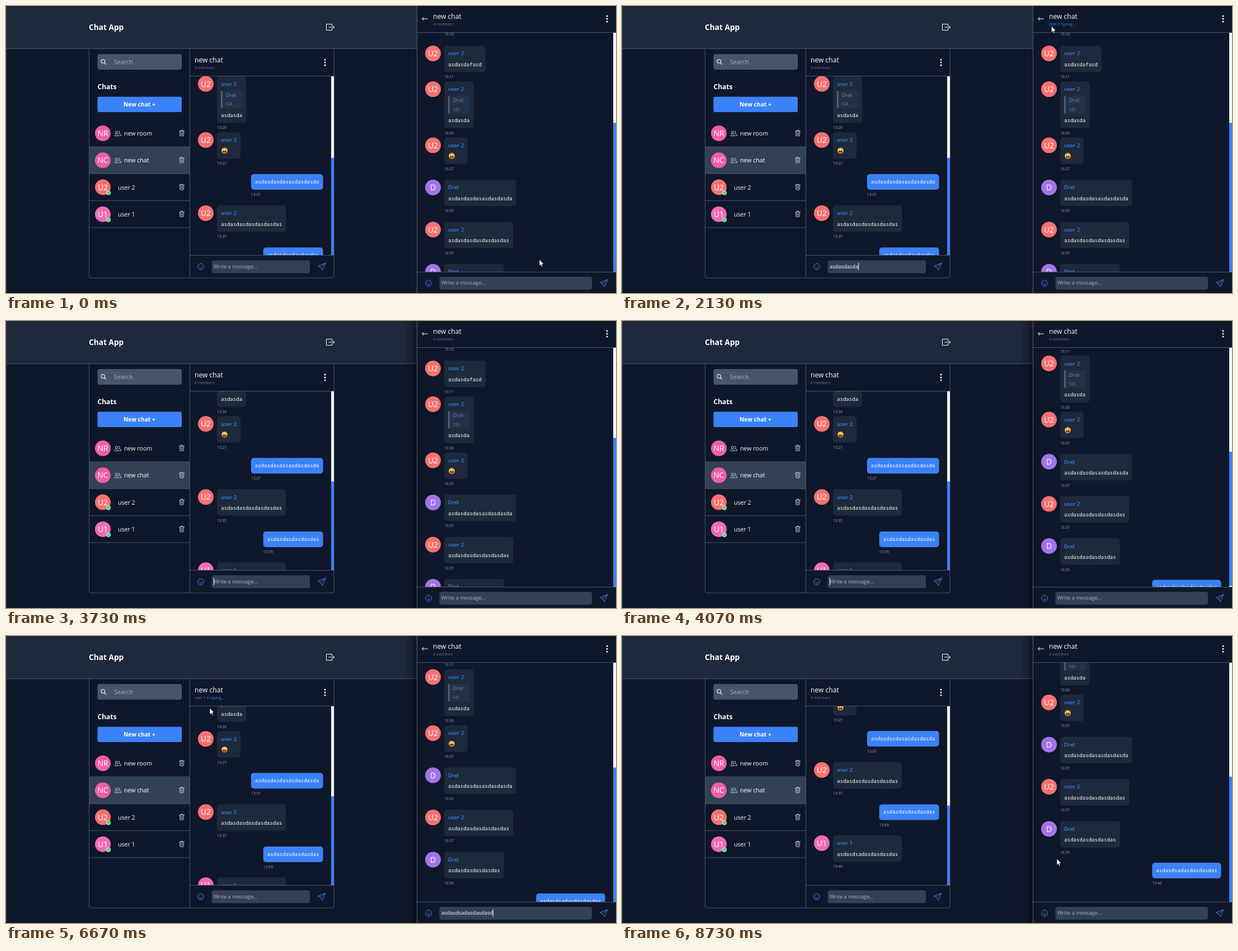
Animation, 1090 px wide and 514 px high, one loop 9540 ms. Source, as an HTML page:

```html
<!DOCTYPE html>
<html lang="en">
<head>
<meta charset="utf-8">
<title>Chat App</title>
<style>
  html, body { margin: 0; width: 100%; height: 100%; overflow: hidden; background: #0f172a; }
  svg { display: block; width: 100%; height: 100%; font-family: "Open Sans", "Noto Sans", sans-serif; }
  text { white-space: pre; }
  .mono { font-family: "Noto Sans Mono", "DejaVu Sans Mono", monospace; font-weight: 500; }
</style>
</head>
<body>
<svg id="stage" viewBox="0 0 1090 514"></svg>
<script>
const LOOP = 9540, CHAR = 5.46;
const BG = '#0f172a', PANEL = '#1e293b', LINE = '#475569', FIELD = '#334155', BLUE = '#3b82f6';
const RED = '#f87171', PINK = '#ee5fa5', ROSE = '#f06cb4', PURPLE = '#a374e8', GREY = '#6b7280';
const PAL = 'Drel', HINT = 'Write a message...';
const LEFT_MSG = 'asdasdasdasdasdas', RIGHT_MSG = 'asdasdsadasdasdasdas';
const LONG = 'asdasdasdasasdasdasda', REPLY = 'asdasdasdasdasdasdas';

// Drawing helpers; text is placed by its vertical centre.
const text = (x, cy, size, s, fill = '#fff', extra = '') =>
  `<text x="${x}" y="${cy + size * .36}" font-size="${size}" fill="${fill}" ${extra}>${s}</text>`;
const bold = (x, cy, size, s, fill, weight = 700) => text(x, cy, size, s, fill, `font-weight="${weight}"`);
const rect = (x, y, w, h, fill, r = 0, extra = '') =>
  `<rect x="${x}" y="${y}" width="${w}" height="${h}" rx="${r}" fill="${fill}" ${extra}/>`;
const circle = (x, y, r, fill, extra = '') => `<circle cx="${x}" cy="${y}" r="${r}" fill="${fill}" ${extra}/>`;
const icon = (x, y, d, color = '#e5e7eb', w = 1) =>
  `<path transform="translate(${x} ${y})" d="${d}" fill="none" stroke="${color}" stroke-width="${w}" stroke-linecap="round" stroke-linejoin="round"/>`;
const line = (x1, y1, x2, y2, c = LINE) => icon(0, 0, `M${x1} ${y1}L${x2} ${y2}`, c);
const avatar = (x, y, s, color) =>
  circle(x, y, 14, color) + text(x, y, 13.9, s, '#fff', 'text-anchor="middle" font-weight="500"');
const kebab = (x, y) => [-5, 0, 5].map(d => circle(x, y + d, 1.5, '#fff')).join('');

const face = (x, y) => circle(x, y, 5.3, '#fbc02d')
  + circle(x - 2.1, y - 1.7, 1.6, '#fff') + circle(x + 2, y - 1.9, 1.3, '#fff')
  + circle(x - 2, y - 1.6, .8, '#3b2413') + circle(x + 2, y - 1.8, .7, '#3b2413')
  + `<path d="M${x - 3.6} ${y + .6}h7.2a3.6 3.6 0 0 1-7.2 0z" fill="#5b2012"/>`
  + rect(x - 1.4, y + 1.8, 3, 2.7, '#ef4444', 1.3);

const stamp = (x, bottom, s) => text(x, bottom + 8.5, 6.7, s, '#9ca3af');

// A message from somebody else; x is the left edge of the bubble.
function other(x, y, who, body, time, kind) {
  const [name, tag, color] = who;
  const quote = kind === 'quote', emoji = kind === 'emoji';
  const h = quote ? 84 : 47.5, w = emoji ? 42 : body.length * CHAR + 14;
  let out = avatar(x - 20, y + 14, tag, color) + rect(x, y, w, h, PANEL, 5)
    + bold(x + 7, y + 14, 9.5, name, BLUE, 600);
  if (quote) out += rect(x + 7, y + 26.5, 38, 31, '#23324b', 2) + rect(x + 7, y + 26.5, 2.6, 31, '#566275')
    + bold(x + 15.5, y + 34, 9.5, PAL, '#64748b', 600) + text(x + 15.5, y + 50.5, 6.5, '123', '#8490a3');
  out += emoji ? face(x + 13.5, y + 33) : text(x + 7, y + h - 14, 9.1, body, '#fff', 'class="mono"');
  return out + stamp(x, y + h, time);
}

// Own message, aligned to the right edge.
function own(right, y, body, time) {
  const w = body.length * CHAR + 14, x = right - w;
  return rect(x, y, w, 28, BLUE, 5) + text(x + 7, y + 13.5, 9.1, body, '#fff', 'class="mono"') + stamp(x, y + 28, time);
}

const U1 = ['user 1', 'U1', ROSE], U2 = ['user 2', 'U2', RED], P = [PAL, PAL[0], PURPLE];

const leftList = other(377, 125.5, U2, 'asdasda', '13:26', 'quote')
  + other(377, 226, U2, '', '13:27', 'emoji')
  + own(566.5, 301, LONG, '13:37')
  + other(377, 357, U2, REPLY, '13:37')
  + own(566.5, 432.6, LEFT_MSG, '13:39')
  + other(377, 488, U1, RIGHT_MSG, '13:40');

const rightList = stamp(783, 42.5, '13:10')
  + other(783, 71, U2, 'asdasdafasd', '13:11')
  + other(783, 135, U2, 'asdasda', '13:26', 'quote')
  + other(783, 235.5, U2, '', '13:27', 'emoji')
  + other(783, 311, P, LONG, '13:37')
  + other(783, 386.5, U2, REPLY, '13:37')
  + other(783, 462, P, LEFT_MSG, '13:39')
  + own(1070.5, 536.5, RIGHT_MSG, '13:40');

function room(i, name, tag, color, group) {
  const y = 228 + i * 48.3;
  return (i === 1 ? rect(149, 252, 179, 48, FIELD) : '')
    + avatar(173, y, tag, color)
    + (group
      ? icon(200, y, 'M-5.5 4.2c0-5 6-5 6 0zM-4.6-1.8a2 2 0 1 0 4 0a2 2 0 1 0-4 0M1.2-.2a1.8 1.8 0 1 0-.6-3.3M2.2 4.2h3.3c0-2.6-1.2-3.6-3-3.6', '#cbd5e1', .9)
      : circle(183, y + 10, 3.7, '#4ade80', 'stroke="#e5f5ea" stroke-width=".9"'))
    + text(group ? 211 : 200, y + .3, 10.6, name)
    + icon(314, y - .5, 'M-4.5-3.5h9M-1.5-3.5v-1.5h3v1.5M-3.5-3.5l.5 8.5h6l.5-8.5M-1.2-1.5v4.5M1.2-1.5v4.5', '#cbd5e1', .9)
    + line(149, y + 24, 328, y + 24);
}

const composer = (id, smileX, inX, inW, sendX, y) =>
  icon(smileX, y, 'M-5.5 0a5.5 5.5 0 1 0 11 0a5.5 5.5 0 1 0-11 0M-2.5 1.5q2.5 2.6 5 0M-2-1.7v.4M2-1.7v.4', BLUE)
  + rect(inX, y - 11.5, inW, 23, FIELD, 4)
  + `<text id="${id}In" x="${inX + 3.5}" y="${y + 2.8}" font-size="9.3"></text>`
  + rect(0, y - 7, 1, 13, '#fff', 0, `id="${id}Caret"`)
  + icon(sendX, y, 'M6.5-6.5L-6.5-1.2L-2 1.3L1.2 6.2ZM6.5-6.5L-2 1.3', BLUE);

const bar = (id, x, y, h) => rect(x, y, 5, h, '#f1f5f9') + rect(x, y, 5, h, BLUE, 1.5, `id="${id}Thumb"`);
const status = (id, x, cy) => `<text id="${id}Status" x="${x}" y="${cy + 2.4}" font-size="6.8"></text>`;

document.getElementById('stage').innerHTML = `
<defs>
  <clipPath id="leftClip">${rect(329, 126, 252, 320, '#000')}</clipPath>
  <clipPath id="rightClip">${rect(735, 48, 350, 428, '#000')}</clipPath>
  <linearGradient id="shade"><stop stop-opacity="0"/><stop offset="1" stop-opacity=".38"/></linearGradient>
  <linearGradient id="split" x2="0" y2="1"><stop stop-color="#3b424d"/><stop offset=".4" stop-color="#262b35"/><stop offset="1" stop-color="#262b35"/></linearGradient>
</defs>
${rect(0, 0, 1090, 514, BG)}${rect(0, 0, 734, 76, PANEL)}${line(0, 76.5, 734, 76.5)}
${bold(148, 38.5, 13.7, 'Chat App')}
${icon(579, 38, 'M3.5-2.5v-3h-10v11h10v-3M-2 0h9.5M5-2.5L7.5 0L5 2.5', '#fff')}
<path d="M148.5 77V484a3 3 0 0 0 3 3H583a3 3 0 0 0 3-3V77" fill="none" stroke="${LINE}"/>
${rect(163.5, 86, 150.5, 28, LINE, 4)}
${icon(174, 100, 'M-4-1a3.3 3.3 0 1 0 6.6 0a3.3 3.3 0 1 0-6.6 0M1.8 1.7L4.6 4.5', '#fff', 1.1)}
${text(193, 100.5, 10.75, 'Search', '#a8b2c1')}
${bold(163.5, 144.5, 12, 'Chats')}
${rect(163.5, 162.5, 150.5, 27.5, BLUE, 3)}${bold(210, 176.5, 10.25, 'New chat +')}
${room(0, 'new room', 'NR', PINK, 1)}${room(1, 'new chat', 'NC', PINK, 1)}${room(2, 'user 2', 'U2', RED)}${room(3, 'user 1', 'U1', ROSE)}
${line(328.5, 77, 328.5, 487)}
${text(337, 96.5, 12.1, 'new chat')}${status('left', 337, 111)}${kebab(570, 101)}
<g clip-path="url(#leftClip)"><g id="leftList">${leftList}</g></g>
${bar('left', 581, 126, 320)}
${line(329, 125.5, 586, 125.5)}${line(329, 446.5, 586, 446.5)}
${composer('left', 348, 367.5, 175.5, 564, 467)}
${line(.5, 0, .5, 514, '#3a4353')}
${rect(712, 0, 22, 514, 'url(#shade)', 0, 'id="shadow"')}
${rect(734, 0, 356, 514, BG)}
${icon(748.5, 23, 'M5 0H-5M-2-3L-5 0L-2 3', '#fff')}
${text(763, 18.5, 12.1, 'new chat')}${status('right', 763, 33)}${kebab(1074, 23)}
<g clip-path="url(#rightClip)"><g id="rightList">${rightList}</g></g>
${bar('right', 1085, 48, 428)}
${line(734, 47.5, 1090, 47.5)}${line(734, 476.5, 1090, 476.5)}
${composer('right', 755, 774.5, 272.5, 1068, 496.5)}
${line(734.5, 0, 734.5, 514, '#59616f')}
<g id="divider">${rect(728, 0, 12, 514, 'url(#split)')}${rect(733, 214, 2.5, 26, '#fff', 1)}</g>
<path id="resize" d="M731 188.5l3.5-3v2.2h7.5v-2.2l3.5 3l-3.5 3v-2.2h-7.5v2.2z" fill="#fff" stroke="#000" stroke-width=".5"/>
<path id="arrow" d="M0 0V11.5L2.7 9L4.6 13.2L6.4 12.4L4.5 8.3H8Z" fill="#fff" stroke="#000" stroke-width=".6"/>`;

const $ = id => document.getElementById(id);
const show = (id, on) => $(id).setAttribute('visibility', on ? 'visible' : 'hidden');
const within = (t, a, b) => t >= a && t < b;
const ease = (t, start, dur) => {
  const p = Math.min(1, Math.max(0, (t - start) / dur));
  return p * p * (3 - 2 * p);
};

// Pointer path: time, x, y.
const PATH = [
  [0, 953, 454], [70, 953, 454], [300, 850, 488], [500, 620, 494], [730, 450, 462], [930, 450, 460],
  [1200, 720, 326], [1500, 775, 40], [1800, 808, 38], [2100, 765, 36], [2500, 795, 34], [2870, 770, 60],
  [3060, 738, 188], [3530, 738, 188], [3730, 1036, 490], [4870, 800, 490], [4930, 790, 470],
  [5300, 360, 140], [5600, 312, 90], [5900, 330, 110], [6300, 380, 120], [6600, 364, 129], [6720, 364, 129],
  [6870, 905, 420], [7000, 1066, 492], [8330, 860, 300], [8530, 736, 216], [8600, 742, 290],
  [8670, 790, 444], [8730, 777, 399], [LOOP, 777, 399]
];
const HIDDEN = [[690, 950], [3050, 3540], [3700, 4900], [7030, 8350]];

function pointer(t) {
  const i = PATH.findIndex(p => p[0] > t);
  const [t0, x0, y0] = PATH[i - 1], [t1, x1, y1] = PATH[i];
  const p = (t - t0) / (t1 - t0);
  return [x0 + (x1 - x0) * p, y0 + (y1 - y0) * p];
}

const pen = document.createElement('canvas').getContext('2d');
pen.font = '9.3px "Open Sans", "Noto Sans", sans-serif';

function input(id, x, typed, caret) {
  const el = $(id + 'In');
  el.textContent = typed || HINT;
  el.setAttribute('fill', typed ? '#fff' : '#a8b2c1');
  $(id + 'Caret').setAttribute('x', x + pen.measureText(typed).width);
  show(id + 'Caret', caret);
}

function scroll(id, top, view, base, added, moved) {
  const content = base + added, thumb = $(id + 'Thumb');
  $(id + 'List').setAttribute('transform', `translate(0 ${-moved})`);
  thumb.setAttribute('y', top + (base - view + moved) / content * view);
  thumb.setAttribute('height', view * view / content);
}

function setStatus(id, who) {
  $(id + 'Status').textContent = who ? who + ' is typing...' : '4 members';
  $(id + 'Status').setAttribute('fill', who ? BLUE : GREY);
}

function frame() {
  const t = performance.now() % LOOP;

  const leftCount = within(t, 1130, 2930) ? Math.floor((t - 1130) / 105) + 1 : 0;
  input('left', 371, LEFT_MSG.slice(0, leftCount), within(t, 600, 2930) || within(t, 3600, 4600));
  const rightCount = !within(t, 4930, 7000) ? 0
    : t < 5870 ? Math.floor((t - 4930) / 66) + 1 : 15 + Math.floor((t - 5870) / 220);
  input('right', 778, RIGHT_MSG.slice(0, rightCount), within(t, 4800, 7000));

  setStatus('right', within(t, 1130, 3000) && PAL);
  setStatus('left', within(t, 5070, 7060) && 'user 1');

  const sent = t >= 3130 ? 55.7 : 0;
  scroll('left', 126, 320, 588, sent + (t >= 7980 ? 75.3 : 0), sent + 75.3 * ease(t, 7980, 400));
  scroll('right', 48, 428, 686, (t >= 3880 ? 75.5 : 0) + (t >= 7010 ? 55 : 0),
    75.5 * ease(t, 3880, 215) + 55 * ease(t, 7010, 300));

  show('shadow', t >= 3670);
  show('divider', within(t, 3060, 3560) || within(t, 8430, 8520));
  show('resize', within(t, 3050, 3540));
  show('arrow', !HIDDEN.some(([a, b]) => within(t, a, b)));
  $('arrow').setAttribute('transform', `translate(${pointer(t)})`);
  requestAnimationFrame(frame);
}
frame();
</script>
</body>
</html>
```
